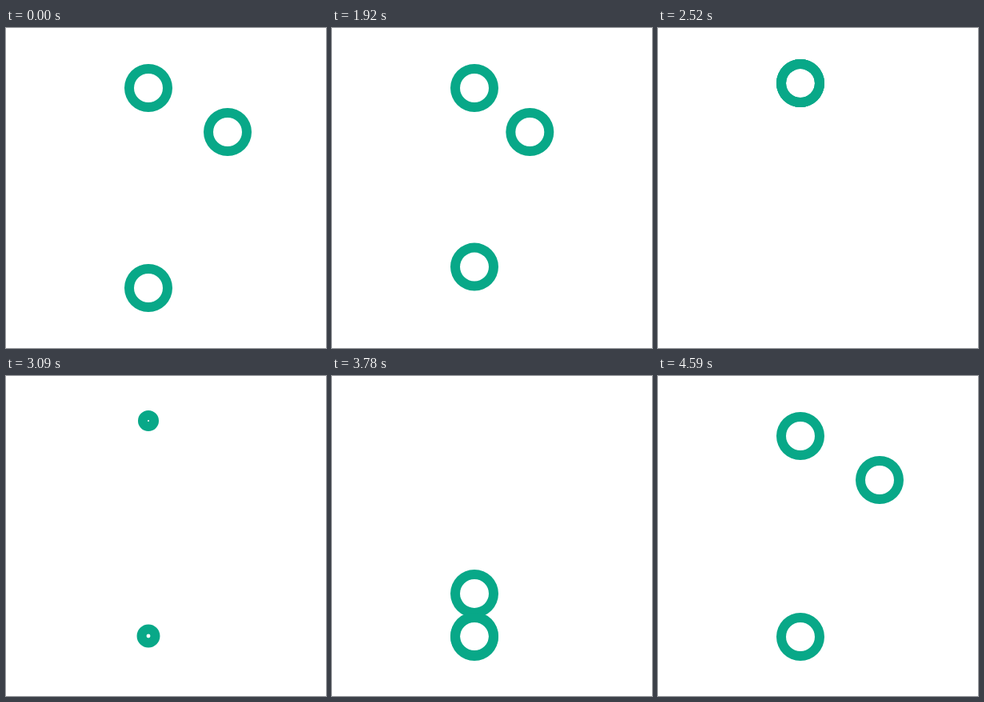
Recreate the animation shown at these times as an HTML page with a canvas. Size 400 px wide and 400 px high, loop 4620 ms.

```html
<!DOCTYPE html>
<html lang="en">
<head>
<meta charset="utf-8">
<title>Branch loop</title>
<style>
  html, body { margin: 0; width: 100%; height: 100%; overflow: hidden; background: #fff; }
  canvas { display: block; width: 400px; height: 400px; }
</style>
</head>
<body>
<canvas id="stage" width="400" height="400"></canvas>
<script>
const ctx = document.getElementById('stage').getContext('2d');
const LOOP = 4620, STEP = 30;
const GREEN = '#08a888';
const X = 178, RADIUS = 24, WEIGHT = 12, OUTER = RADIUS + WEIGHT / 2;

const clamp = v => Math.min(1, Math.max(0, v));
const mix = (a, b, k) => a + (b - a) * k;
const smooth = v => { v = clamp(v); return v * v * (3 - 2 * v); };

// cubic-bezier(.75, 0, .25, 1), solved by bisection
function ease(u) {
  if (u <= 0) return 0;
  if (u >= 1) return 1;
  let lo = 0, hi = 1;
  for (let i = 0; i < 30; i++) {
    const s = (lo + hi) / 2, q = 1 - s;
    const x = 2.25 * s * q * q + 0.75 * s * s * q + s * s * s;
    if (x < u) lo = s; else hi = s;
  }
  return smooth((lo + hi) / 2);
}

const move = (t, start, length, from, to) => mix(from, to, ease((t - start) / length));

function ring(x, y, r = RADIUS) {
  if (r < 0.3) return;
  // a radius below half the weight closes the hole
  const outer = r + WEIGHT / 2, hole = r - WEIGHT / 2;
  ctx.beginPath();
  ctx.arc(x, y, outer, 0, Math.PI * 2);
  if (hole > 0) {
    ctx.moveTo(x + hole, y);
    ctx.arc(x, y, hole, 0, Math.PI * 2, true);
  }
  ctx.fillStyle = GREEN;
  ctx.fill();
}

function trunk(top, bottom) {
  const from = top + OUTER - 1, to = bottom - OUTER + 1;
  if (to <= from) return;
  ctx.fillStyle = '#fff';
  ctx.fillRect(X - WEIGHT / 2, from, WEIGHT, to - from);
}

// The lower ring rises and pushes the others up.
function gather(t) {
  const bottom = move(t, 1500, 1340, 325, 56);
  const top = Math.min(75, bottom);
  ring(move(t, 1510, 927, 277, X), Math.min(130, bottom));
  trunk(top, bottom);
  ring(X, top);
  ring(X, bottom);
}

// One ring closes at the top while another opens below.
function swap(t) {
  ring(X, 56, move(t, 2830, 464, RADIUS, 0));
  ring(X, move(t, 3240, 1340, 325, 75), move(t, 2830, 565, 0, RADIUS));
}

// The rings part again, the side one along a curved branch.
function spread(t) {
  const top = move(t, 3240, 1340, 325, 75), bottom = 326;
  const side = move(t, 3720, 707, bottom, 130);
  ring(mix(X, 277, smooth((310 - side) / 125)), side);
  trunk(top, bottom);
  ring(X, top);
  ring(X, bottom);
}

function draw(now) {
  const t = Math.floor((now % LOOP) / STEP) * STEP;
  ctx.fillStyle = '#fff';
  ctx.fillRect(0, 0, 400, 400);
  if (t < 2840) gather(t);
  else if (t < 3690) swap(t);
  else spread(t);
}

let begin = null;
function tick(now) {
  if (begin === null) begin = now;
  draw(now - begin);
  requestAnimationFrame(tick);
}
draw(0);
requestAnimationFrame(tick);
</script>
</body>
</html>
```
